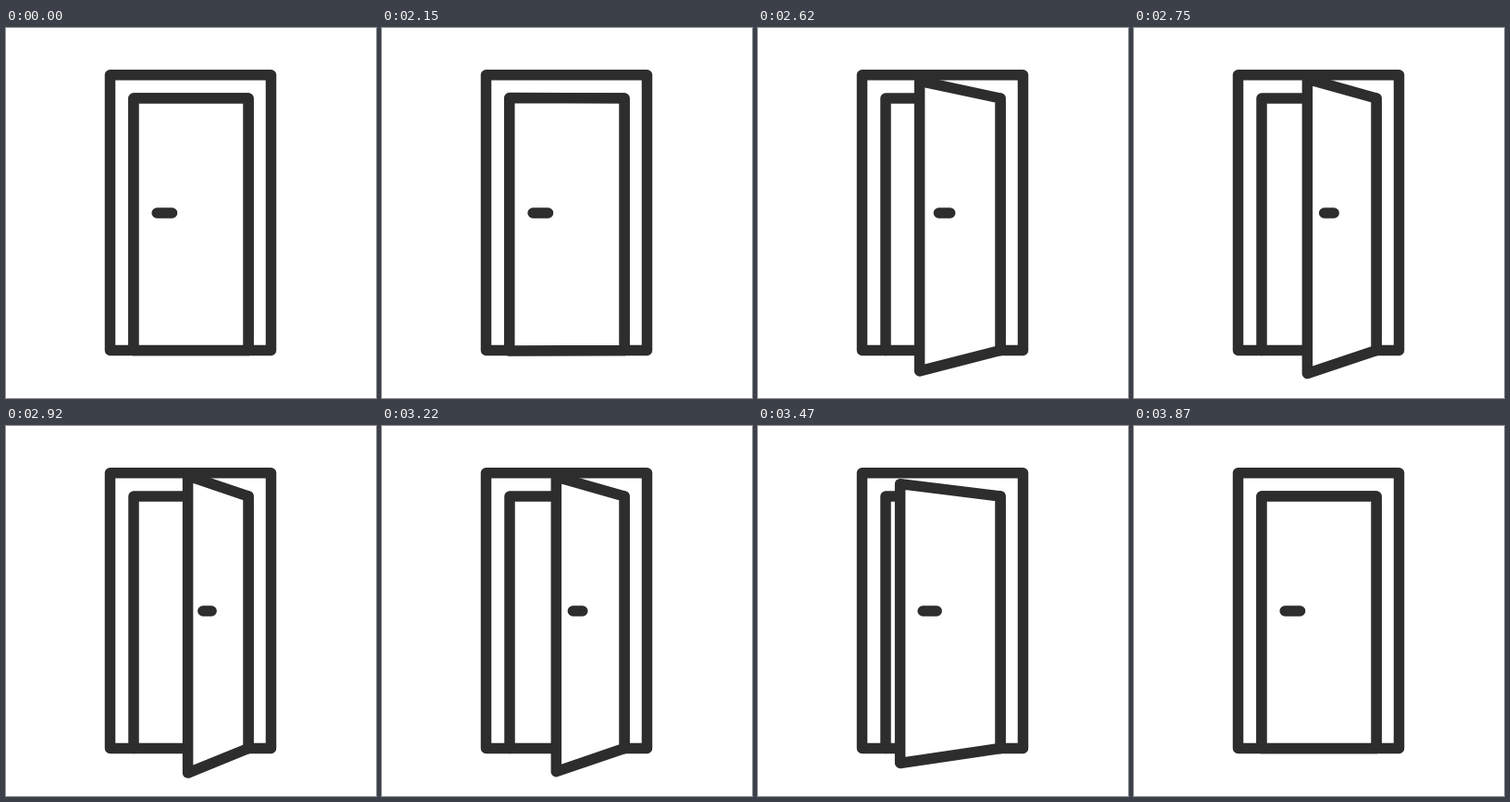
An HTML page that plays this animation: 400 px wide and 400 px high, repeating every 4.02 s.

```html
<!DOCTYPE html>
<html lang="en">
<head>
<meta charset="utf-8">
<title>Door</title>
<style>
  html, body { margin: 0; width: 100%; height: 100%; overflow: hidden; background: #fff; }
  svg { display: block; width: 100%; height: 100%; }
  path { fill: none; stroke: #2d2d2d; stroke-width: 11.5; stroke-linecap: round; stroke-linejoin: round; }
  #door { fill: #fff; }
</style>
</head>
<body>
<svg viewBox="0 0 400 400">
  <path d="M112.5 50.7H286.5V348.5H112.5Z"/>
  <path d="M138 348.5V76H262V348.5"/>
  <path id="door"/>
  <path id="handle"/>
</svg>
<script>
  const LOOP = 4020, START = 2150, PEAK = 3010, END = 3880;
  const MAX_ANGLE = 59 * Math.PI / 180;
  const HINGE = 262, TOP = 76, BOTTOM = 348.5, EYE = 200;
  const DEPTH = 0.178 / 124;

  const door = document.getElementById('door');
  const handle = document.getElementById('handle');

  const ease = (p, power) => Math.sin(Math.PI / 2 * Math.pow(p, power)) ** 2;

  function angleAt(t) {
    if (t < START || t >= END) return 0;
    if (t < PEAK) return MAX_ANGLE * ease((t - START + 15) / (PEAK - START + 15), 0.59);
    return MAX_ANGLE * (1 - ease((t - PEAK) / (END - PEAK), 1.22));
  }

  // Projects a point on the door, given by its closed position, seen from the stage centre.
  function project(x, y, angle, lift = 0) {
    const reach = HINGE - x;
    const scale = 1 / (1 - DEPTH * reach * Math.sin(angle));
    const turned = HINGE - reach * Math.cos(angle) + lift * Math.sin(angle);
    return [EYE + (turned - EYE) * scale, EYE + (y - EYE) * scale]
      .map(v => v.toFixed(2)).join(' ');
  }

  function draw(t) {
    const a = angleAt(t);
    door.setAttribute('d', `M${project(138, TOP, a)}L${project(HINGE, TOP, a)}` +
      `L${project(HINGE, BOTTOM, a)}L${project(138, BOTTOM, a)}Z`);
    handle.setAttribute('d', `M${project(163.2, EYE, a, 1.2)}L${project(179.6, EYE, a, 1.2)}`);
  }

  const origin = performance.now();
  function tick() {
    draw((performance.now() - origin) % LOOP);
    requestAnimationFrame(tick);
  }
  tick();
</script>
</body>
</html>
```
